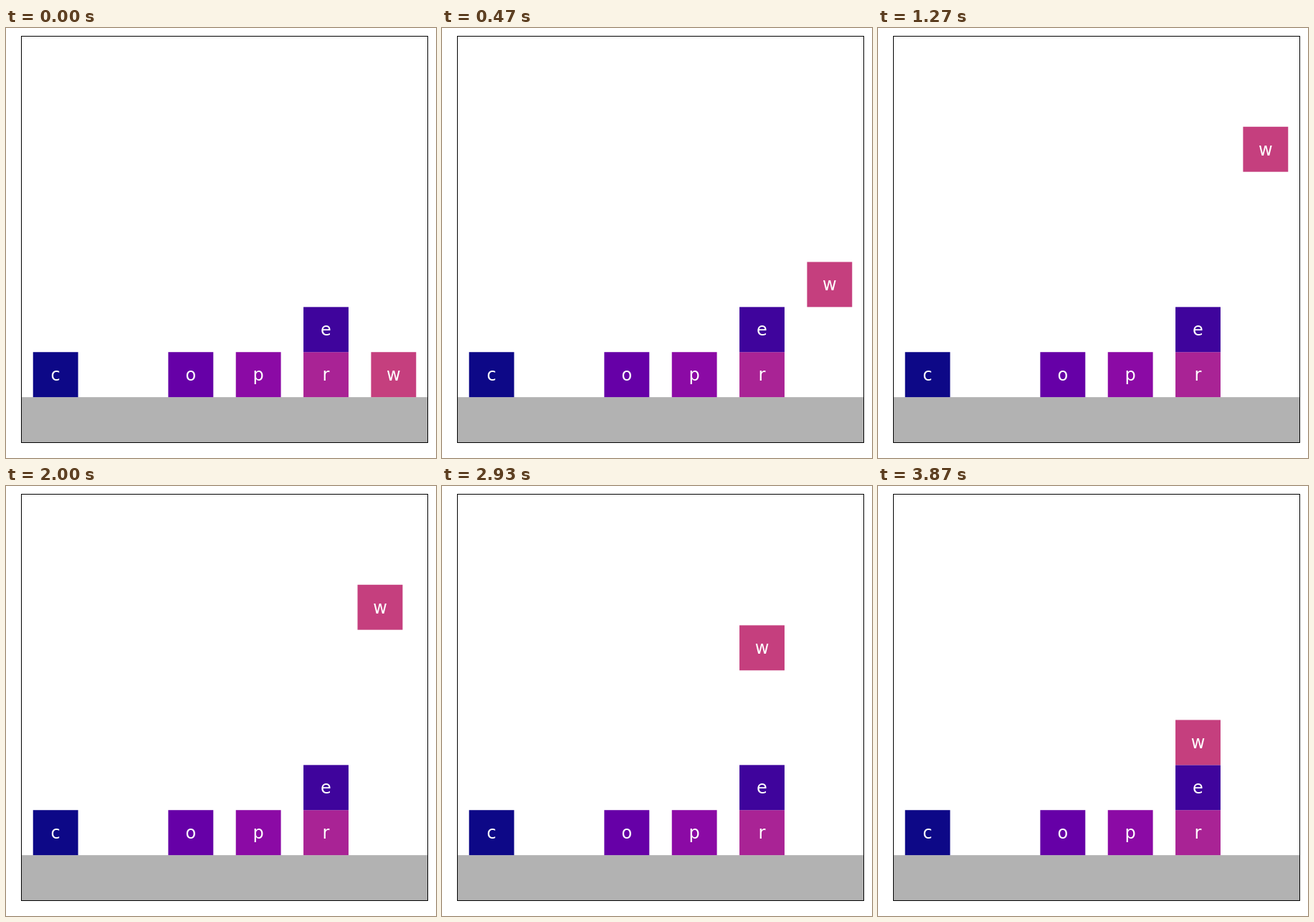
Recreate the animation shown at these times as an HTML page with a canvas. Size 600x600 px, loop 3.94 s.

```html
<!DOCTYPE html>
<html lang="en">
<head>
<meta charset="utf-8">
<title>Stacking blocks</title>
<style>
  html, body { margin: 0; width: 100%; height: 100%; overflow: hidden; background: #fff; }
  canvas { display: block; }
</style>
</head>
<body>
<canvas id="stage" width="600" height="600"></canvas>
<script>
const ctx = document.getElementById('stage').getContext('2d');
const LOOP = 3940, LAST_TICK = 58;
const LEFT = 22, TOP = 12, SIZE = 566, UNIT = SIZE / 9;

const columnX = column => LEFT + (0.25 + 1.5 * column) * UNIT;
const rowY = row => TOP + (7 - row) * UNIT;
const tickStart = tick => Math.round(tick * 20 / 3) * 10;
const progress = (step, count) => Math.min(Math.max(step / count, 0), 1);
const lerp = (a, b, p) => a + (b - a) * p;

function currentTick(time) {
  let tick = LAST_TICK;
  while (tick > 0 && tickStart(tick) > time) tick--;
  return tick;
}

// Lift, wait, slide one column left, then lower onto the stack.
function movingBlock(tick) {
  const lift = tick < 1 ? 0 : progress(tick + 1, 20);
  const slide = tick < 30 ? 0 : progress(tick - 28, 10);
  const lower = progress(tick - 38, 20);
  return { column: lerp(5, 4, slide), row: lerp(lerp(0, 5, lift), 2, lower) };
}

function drawBlock(label, color, column, row) {
  const x = columnX(column), y = rowY(row) - 0;
  ctx.fillStyle = color;
  ctx.fillRect(x, y, UNIT, UNIT);
  ctx.fillStyle = '#fff';
  ctx.fillText(label, x + UNIT / 2, y + UNIT / 2 + 8.3);
}

function draw(time) {
  const { column, row } = movingBlock(currentTick(time));
  ctx.fillStyle = '#fff';
  ctx.fillRect(0, 0, 600, 600);
  ctx.fillStyle = '#b2b2b2';
  ctx.fillRect(LEFT, rowY(-1), SIZE, UNIT);

  ctx.font = '24px "DejaVu Sans", sans-serif';
  ctx.textAlign = 'center';
  ctx.textBaseline = 'alphabetic';
  drawBlock('c', '#0d0887', 0, 0);
  drawBlock('o', '#6600a7', 2, 0);
  drawBlock('p', '#8b0aa5', 3, 0);
  drawBlock('r', '#a92395', 4, 0);
  drawBlock('e', '#3f049c', 4, 1);
  drawBlock('w', '#c53f7e', column, row);

  ctx.strokeStyle = '#000';
  ctx.lineWidth = 1;
  ctx.strokeRect(LEFT - 0.5, TOP - 0.5, SIZE + 1, SIZE + 1);
}

const start = performance.now();
function loop() {
  draw((performance.now() - start) % LOOP);
  requestAnimationFrame(loop);
}
loop();
</script>
</body>
</html>
```
